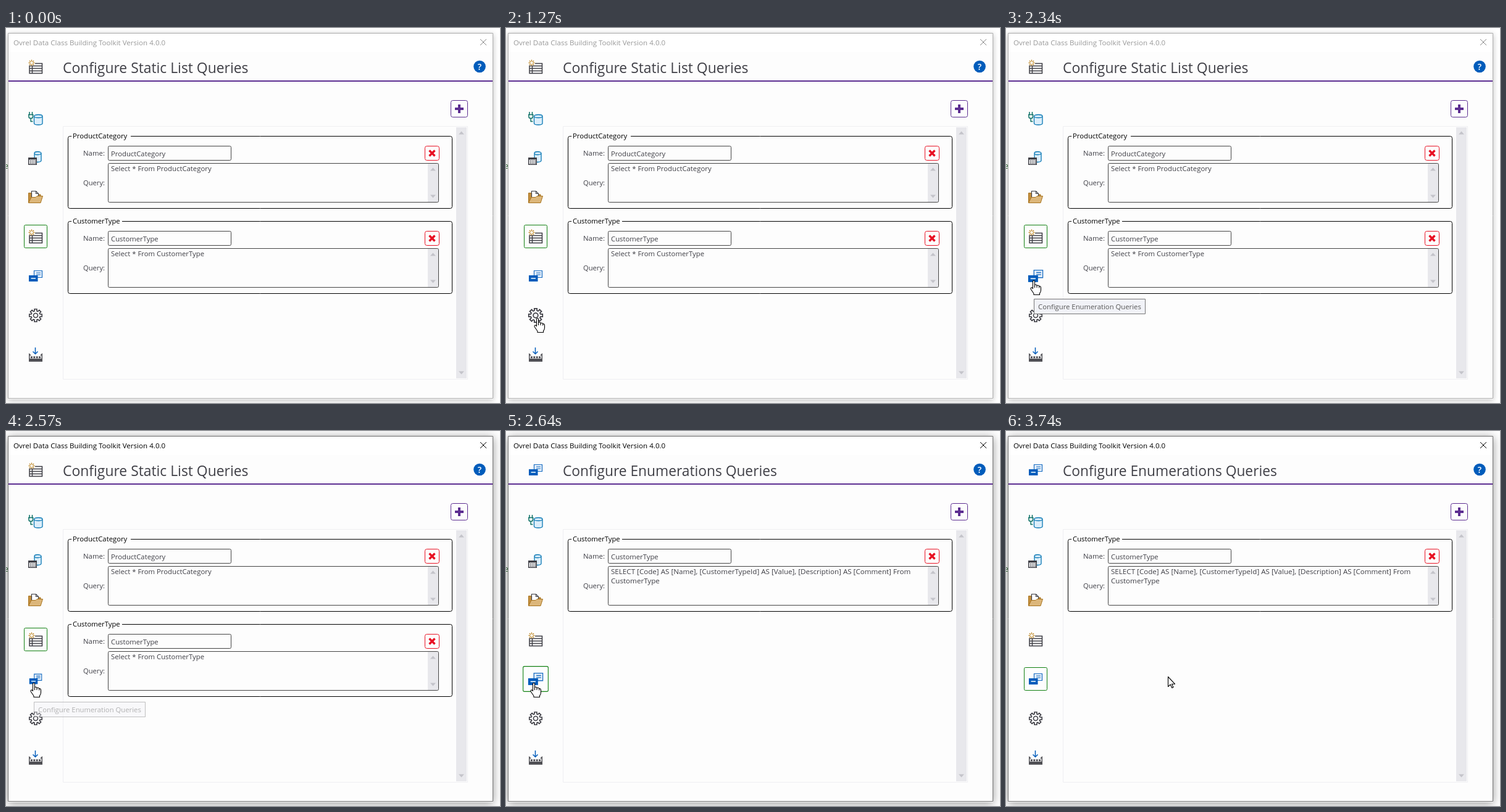
Animation, 800 px wide and 608 px high, one loop 8 s. Source, as an HTML page with a canvas:

```html
<!DOCTYPE html>
<html lang="en">
<head>
<meta charset="utf-8">
<title>Query configuration</title>
<style>
html, body { margin: 0; width: 100%; height: 100%; overflow: hidden; background: #fff; }
canvas { display: block; }
</style>
</head>
<body>
<canvas id="stage" width="800" height="608"></canvas>
<script>
const ctx = document.getElementById('stage').getContext('2d');
const LOOP = 8000;
const PURPLE = '#5c2d91', DARK = '#3f3f46', BLUE = '#005cbb', PAPER = '#fdfdfd', BAR = '#e8e8ec';

// Cursor path as [time, x, y] of the hotspot.
const PATH = [
  [500, 113, 600], [640, 90, 482], [740, 62, 402], [800, 54, 388], [840, 53, 386],
  [950, 52, 405], [1100, 51, 450], [1270, 51, 470], [2040, 51, 470], [2080, 50, 458],
  [2120, 48, 440], [2170, 46, 425], [2200, 45, 420], [2300, 45, 411], [2360, 45, 408],
  [3110, 45, 408], [3170, 45, 415], [3370, 45, 415], [3440, 72, 418], [3520, 150, 412],
  [3620, 230, 403], [3740, 262, 398]
];

const HAND = new Path2D('M-1.5 13V2Q-1.5 .5 0 .5T1.5 2V8Q1.5 7 3 7T5 8.5Q5.5 8 7 8.3T8.7 9.8Q9 9.2 10.2 9.8T11.5 12V16Q11.5 19 9.5 21V23.5H0V21.5L-4.8 14.5Q-5.5 12.5 -4.2 12T-1.5 13.5Z');
const KNUCKLES = new Path2D('M1.5 8V12M5 8.5V12M8.7 9.8V12.5');
const ARROW = new Path2D('M.5 .5V16.5L4.2 13L6.8 18.5L9 17.5L6.5 12.2H11.5Z');

const ramp = (t, a, b) => Math.min(1, Math.max(0, (t - a) / (b - a)));

function rect(x, y, w, h, fill) {
  ctx.fillStyle = fill;
  ctx.fillRect(x, y, w, h);
}

function box(x, y, w, h, stroke, radius = 0, fill = null, width = 1) {
  ctx.beginPath();
  ctx.roundRect(x + 0.5, y + 0.5, w - 1, h - 1, radius);
  if (fill) { ctx.fillStyle = fill; ctx.fill(); }
  ctx.strokeStyle = stroke;
  ctx.lineWidth = width;
  ctx.stroke();
}

function path(d, stroke, width = 1, fill = null) {
  const shape = new Path2D(d);
  if (fill) { ctx.fillStyle = fill; ctx.fill(shape); }
  if (stroke) { ctx.strokeStyle = stroke; ctx.lineWidth = width; ctx.stroke(shape); }
}

function text(str, x, y, size = 11.4, color = DARK, weight = 400) {
  ctx.font = `${weight} ${size}px "Open Sans", "Noto Sans", sans-serif`;
  ctx.fillStyle = color;
  ctx.fillText(str, x, y);
}

function triangle(x, y, dir) {
  path(`M${x - 4.5} ${y + 2.5 * dir}H${x + 4.5}L${x} ${y - 2.5 * dir}Z`, null, 0, '#c4c4ca');
}

function scrollbar(x, y, w, h) {
  rect(x, y, w, h, BAR);
  triangle(x + w / 2, y + 9, 1);
  triangle(x + w / 2, y + h - 9, -1);
}

function cylinder(x, y, w, h) {
  const r = w / 2;
  path(`M${x} ${y + 2.5}V${y + h - 2.5}A${r} 2.5 0 0 0 ${x + w} ${y + h - 2.5}V${y + 2.5}` +
    `A${r} 2.5 0 0 0 ${x} ${y + 2.5}A${r} 2.5 0 0 0 ${x + w} ${y + 2.5}`, '#0a78b4', 1.3, '#dceefa');
}

// Icons are drawn around their own centre.
const icons = {
  connect() {
    cylinder(-2.5, -6.5, 13.5, 16.5);
    path('M-10 -11V-7M-5.5 -11V-7M-12 -6.5H-3.5M-11 -6.5V-3Q-11 -.5 -7.8 -.5T-4.5 -3V-6.5M-7.8 -.5V4.5H-4.5', '#0c7065', 1.5);
  },
  tables() {
    cylinder(-2, -10.5, 11, 17);
    rect(-12, -1, 14, 12, DARK);
    rect(-10.5, 2.5, 11, 7, '#fff');
    for (const y of [4, 7]) for (const x of [-9, -5.5, -2]) rect(x, y, 2.4, 1.4, DARK);
  },
  folder() {
    path('M-11.5 9V-6.5H-5L-3 -4H8V9Z', '#a8741f', 1, '#c58f3d');
    path('M-6.5 4V-9.5H.5L4.5 -5.5V4Z', DARK, 1.2, '#fff');
    path('M.5 -9.5V-5.5H4.5', DARK, 1.2);
    path('M-11.5 9.5L-7 .5H0L2 -1.5H11.5L8 9.5Z', '#a8741f', 1, '#dcb67a');
  },
  list() {
    path('M-1 -5.5H10.5V10.5H-10V-1.5H10.5M-10 2.5H10.5M-10 6.5H10.5M-5.5 -1.5V10.5', DARK, 1.5);
    for (let i = 0; i < 8; i++) {
      const c = Math.cos(i * Math.PI / 4), s = Math.sin(i * Math.PI / 4);
      path(`M${-6.5 + 2 * c} ${-6.5 + 2 * s}L${-6.5 + 5 * c} ${-6.5 + 5 * s}`, '#bd8420', 1.3);
    }
  },
  enums() {
    path('M-2.5 -8.5H10.5V2.5H-2.5Z', '#1b6ec2', 1.2, '#e3eefa');
    path('M1 -5H8M1 -2H8', '#1b6ec2', 1.2);
    rect(-11, -1, 14.5, 10, BLUE);
    rect(-7.5, 3.2, 7.5, 1.5, '#fff');
  },
  gear() {
    let d = '';
    for (let i = 0; i < 8; i++) {
      for (const [r, turn] of [[7.3, -.27], [10.4, -.19], [10.4, .19], [7.3, .27]]) {
        const a = i * Math.PI / 4 + turn;
        d += `${d ? 'L' : 'M'}${r * Math.cos(a)} ${r * Math.sin(a)}`;
      }
    }
    path(d + 'Z', DARK, 1.6);
    ctx.beginPath();
    ctx.arc(0, 0, 3.5, 0, 7);
    ctx.stroke();
  },
  build() {
    path('M-11 -3V11H11V-3L7 1H-7Z', null, 0, '#505055');
    rect(-9.5, 1, 19, 5, '#f4f4f4');
    for (const x of [-8, -3.6, .8, 5.2]) rect(x, 2.5, 2.8, 2.8, DARK);
    rect(-4, -4, 8, 4, PAPER);
    path('M-.5 -12V-2M-4.5 -5.5L-.5 -1.5L3.5 -5.5', BLUE, 1.5);
  }
};

const MENU = [['connect', 147], ['tables', 211], ['folder', 274], ['list', 338],
  ['enums', 402], ['gear', 466], ['build', 530]];

function placeIcon(name, y, scale = 1, selected = false) {
  ctx.save();
  ctx.translate(48, y);
  ctx.scale(scale, scale);
  if (selected) box(-19, -19, 38, 38, '#118011', 2);
  icons[name]();
  ctx.restore();
}

function queryGroup(y, name, legendEnd, lines, size) {
  box(100, y, 623, 118, '#000', 3);
  rect(106, y, legendEnd - 106, 1, PAPER);
  text(name, 108, y + 4, 11.3, '#000');
  text('Name:', 125, y + 32);
  text('Query:', 125, y + 80, 11.2);
  box(165, y + 16, 200, 24, '#444', 2);
  text(name, 170, y + 33, 11.3);
  box(678, y + 16, 24, 24, '#e81123', 3);
  path(`M685.5 ${y + 23.5}L694.5 ${y + 32.5}M694.5 ${y + 23.5}L685.5 ${y + 32.5}`, '#e81123', 3.4);
  scrollbar(683, y + 45, 17, 62);
  box(165, y + 44, 536, 64, '#444', 2);
  lines.forEach((line, i) => text(line, 170, y + 57 + 15 * i, size));
}

function windowFrame(active) {
  rect(0, 0, 800, 608, '#fff');
  text('e', -3, 228, 12, '#2d6b34');
  ctx.save();
  ctx.shadowColor = active ? 'rgba(0,0,0,.42)' : 'rgba(0,0,0,.25)';
  ctx.shadowBlur = active ? 14 : 9;
  ctx.shadowOffsetY = 2;
  rect(3, 8, 786, 594, PAPER);
  ctx.restore();
  rect(4, 9, 784, 30, '#fff');
  box(3, 8, 786, 593, active ? '#6e6e6e' : '#aaa');
  text('Ovrel Data Class Building Toolkit Version 4.0.0', 12, 28, 11.6, active ? '#000' : '#999');
  path('M768 18L778 28M778 18L768 28', active ? '#000' : '#888', 1);
}

function content(enumPage, hovered, pressed) {
  placeIcon(enumPage ? 'enums' : 'list', 63);
  text(enumPage ? 'Configure Enumerations Queries' : 'Configure Static List Queries',
    92, 73, enumPage ? 22.75 : 22.9);
  rect(4, 85, 784, 2, PURPLE);
  ctx.beginPath();
  ctx.arc(767, 62.5, 9.8, 0, 7);
  ctx.fillStyle = BLUE;
  ctx.fill();
  text('?', 763.7, 67.5, 14, '#fff', 600);

  box(720, 117, 28, 28, PURPLE, 3);
  rect(727, 129, 14, 4, PURPLE);
  rect(732, 124, 4, 14, PURPLE);

  box(92, 159, 656, 411, '#efeff2');
  scrollbar(729, 161, 17, 407);
  if (enumPage) {
    queryGroup(175, 'CustomerType', 188, [
      'SELECT [Code] AS [Name], [CustomerTypeId] AS [Value], [Description] AS [Comment] From',
      'CustomerType'], 11.62);
  } else {
    queryGroup(175, 'ProductCategory', 202, ['Select * From ProductCategory'], 11.35);
    queryGroup(313, 'CustomerType', 188, ['Select * From CustomerType'], 11.35);
  }

  const selected = enumPage ? 'enums' : 'list';
  for (const [name, y] of MENU) {
    const scale = name !== hovered ? 1 : pressed ? 0.93 : 1.1;
    placeIcon(name, y, scale, name === selected);
  }
}

function tooltip(label, x, y, w, alpha, size) {
  if (alpha <= 0) return;
  ctx.globalAlpha = alpha;
  box(x, y, w, 25, '#767676', 0, '#f1f2f7');
  text(label, x + 7, y + 17, size, '#575757');
  ctx.globalAlpha = 1;
}

function cursorAt(t) {
  if (t < PATH[0][0]) return null;
  const next = PATH.findIndex(p => p[0] > t);
  if (next < 0) return PATH.at(-1).slice(1);
  const [a, b] = [PATH[next - 1], PATH[next]];
  const k = ramp(t, a[0], b[0]);
  return [1, 2].map(i => Math.round(a[i] + (b[i] - a[i]) * k));
}

function drawCursor([x, y], hand) {
  ctx.save();
  ctx.translate(x, y);
  ctx.lineJoin = 'round';
  ctx.lineWidth = 1.1;
  ctx.fillStyle = '#fff';
  ctx.strokeStyle = '#000';
  const shape = hand ? HAND : ARROW;
  ctx.fill(shape);
  ctx.stroke(shape);
  if (hand) ctx.stroke(KNUCKLES);
  ctx.restore();
}

function draw(t) {
  const cursor = cursorAt(t);
  const item = cursor && Math.abs(cursor[0] - 48) <= 19 &&
    MENU.find(([, y]) => Math.abs(cursor[1] - y) <= 19);

  windowFrame(t >= 2470);
  content(t >= 2640, item && item[0], t >= 2470 && t < 2640);

  if (t >= 2600 && t < 2640) {
    rect(4, 39, 784, 561, 'rgba(0,0,0,.2)');
    text('Loading...', 320, 335, 33.2, '#fff');
  }
  tooltip('Configure Build Settings', 51, 489, 142,
    ramp(t, 1610, 1740) - ramp(t, 2105, 2200), 11.45);
  tooltip('Configure Enumeration Queries', 45, 439, 181,
    ramp(t, 2200, 2300) - ramp(t, 2520, 2610), 11.3);
  if (cursor) drawCursor(cursor, item);
}

let start;
function tick(now) {
  start ??= now;
  draw((now - start) % LOOP);
  requestAnimationFrame(tick);
}
requestAnimationFrame(tick);
</script>
</body>
</html>
```
